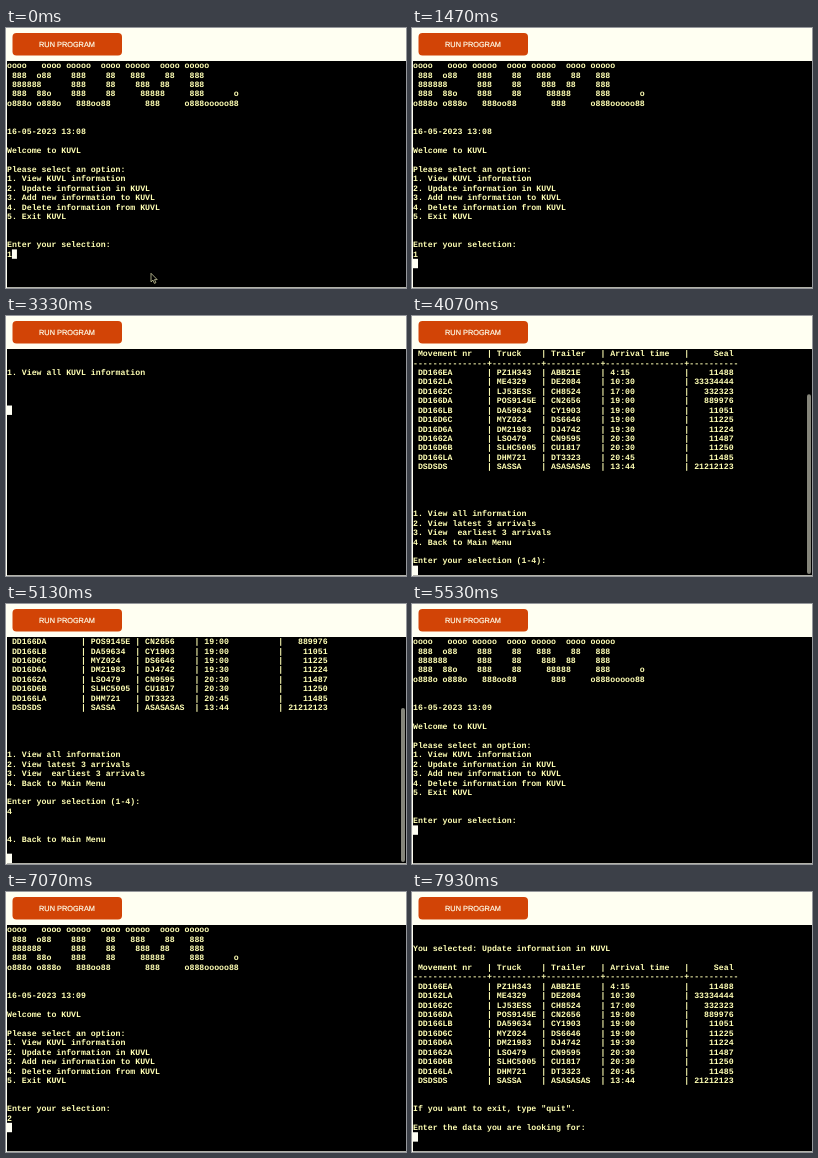
Write an HTML page that moves like this. It is 400 by 260 pixels and loops after 8000 ms.

```html
<!DOCTYPE html>
<html lang="en">
<head>
<meta charset="utf-8">
<title>Terminal session</title>
<style>
  html, body { margin: 0; width: 100%; height: 100%; overflow: hidden; background: #fffff2; }
  svg { display: block; width: 100vw; height: 100vh; }
  text { text-rendering: geometricPrecision; white-space: pre; }
  .row { font: bold 8.22px "Liberation Mono", monospace; fill: #ffffb4; }
  .label {
    font: 7.35px "Liberation Sans", Arial, sans-serif; text-anchor: middle;
    fill: #ffffec; stroke: #ffffec; stroke-width: .2;
  }
</style>
</head>
<body>
<svg viewBox="0 0 400 260">
  <rect width="400" height="260" fill="#fffff2"/>
  <rect x="6.5" y="5" width="109.5" height="22.5" rx="4" fill="#d24406"/>
  <text class="label" x="61" y="19">RUN PROGRAM</text>
  <rect x="1" y="33" width="399" height="226.3" fill="#000"/>
  <g id="rows"></g>
  <rect id="thumb" x="395" width="4" rx="2" fill="#85857a"/>
  <rect id="caret" width="5" height="9.4" fill="#fffff4"/>
  <path id="mouse" d="M145 245.3v8.6l2-1.8 1.4 3.3 1.5-.7-1.4-3.1h2.7z" fill="#000" stroke="#e6e6b4" stroke-width=".7"/>
</svg>
<script>
const LOOP = 8000, ROWS = 24, TOP = 33, LEFT = 1, ROW_H = 9.42, COL_W = 4.933;
const $ = id => document.getElementById(id);
const gap = n => Array(n).fill('');

const banner = [
  'oooo   oooo ooooo  oooo ooooo  oooo ooooo',
  ' 888  o88    888    88   888    88   888',
  ' 888888      888    88    888  88    888',
  ' 888  88o    888    88     88888     888      o',
  'o888o o888o   888oo88       888     o888ooooo88'
];

const records = `DD166EA PZ1H343 ABB21E 4:15 11488
DD162LA ME4329 DE2084 10:30 33334444
DD1662C LJ53ESS CH8524 17:00 332323
DD166DA POS9145E CN2656 19:00 889976
DD166LB DA59634 CY1903 19:00 11051
DD16D6C MYZ024 DS6646 19:00 11225
DD16D6A DM21983 DJ4742 19:30 11224
DD1662A LSO479 CN9595 20:30 11487
DD16D6B SLHC5005 CU1817 20:30 11250
DD166LA DHM721 DT3323 20:45 11485
DSDSDS SASSA ASASASAS 13:44 21212123`.split('\n').map(r => r.split(' '));

const widths = [15, 10, 11, 16, 10];
const format = cells => cells.map((c, i) =>
  i < 4 ? (' ' + c).padEnd(widths[i]) : (c + ' ').padStart(widths[i])).join('|');
const table = [
  format(['Movement nr', 'Truck', 'Trailer', 'Arrival time', 'Seal']),
  widths.map(w => '-'.repeat(w)).join('+'),
  ...records.map(format)
];

const mainMenu = (clock, ...typed) => [
  ...banner, ...gap(2),
  '16-05-2023 ' + clock, '',
  'Welcome to KUVL', '',
  'Please select an option:',
  '1. View KUVL information',
  '2. Update information in KUVL',
  '3. Add new information to KUVL',
  '4. Delete information from KUVL',
  '5. Exit KUVL', ...gap(2),
  'Enter your selection:', ...typed
];
const loading = [...gap(2), '1. View all KUVL information', ...gap(3)];
const viewPage = (...typed) => [
  ...loading, ...table, ...gap(4),
  '1. View all information',
  '2. View latest 3 arrivals',
  '3. View  earliest 3 arrivals',
  '4. Back to Main Menu', '',
  'Enter your selection (1-4):', ...typed
];
const selected = [...gap(2), 'You selected: Update information in KUVL', ''];
const updatePage = [
  ...selected, ...table, ...gap(2),
  'If you want to exit, type "quit".', '',
  'Enter the data you are looking for:', ''
];

// Each screen: start time and lines; the caret follows the last line.
const screens = [
  [0, mainMenu('13:08', '1')],
  [1130, mainMenu('13:08', '1', '')],
  [2800, [...loading, '']],
  [3470, viewPage('')],
  [4600, viewPage('4')],
  [5000, viewPage('4', '', '', '4. Back to Main Menu', '', '')],
  [5400, mainMenu('13:09', '')],
  [6530, mainMenu('13:09', '2')],
  [6870, mainMenu('13:09', '2', '')],
  [7400, [...selected, '']],
  [7670, updatePage]
];

const rows = Array.from({ length: ROWS }, (_, i) => {
  const row = document.createElementNS('http://www.w3.org/2000/svg', 'text');
  row.setAttribute('class', 'row');
  row.setAttribute('x', LEFT);
  row.setAttribute('y', TOP + i * ROW_H + 7.2);
  row.setAttribute('xml:space', 'preserve');
  return $('rows').appendChild(row);
});

function show(lines) {
  const scroll = Math.max(0, lines.length - ROWS);
  rows.forEach((row, i) => { row.textContent = lines[scroll + i] || ''; });

  const last = lines.length - 1;
  $('caret').setAttribute('x', LEFT + lines[last].length * COL_W);
  $('caret').setAttribute('y', TOP + (last - scroll) * ROW_H);

  const full = ROWS * ROW_H, size = Math.min(full, full * ROWS / lines.length);
  $('thumb').setAttribute('visibility', scroll ? 'visible' : 'hidden');
  $('thumb').setAttribute('y', TOP + full - size);
  $('thumb').setAttribute('height', size - 1);
}

let current;
function draw(t) {
  const screen = screens.filter(s => s[0] <= t).pop();
  if (screen !== current) show((current = screen)[1]);
  $('mouse').setAttribute('visibility', t < 70 ? 'visible' : 'hidden');
}

const start = performance.now();
function tick() {
  draw((performance.now() - start) % LOOP);
  requestAnimationFrame(tick);
}
tick();
</script>
</body>
</html>
```
